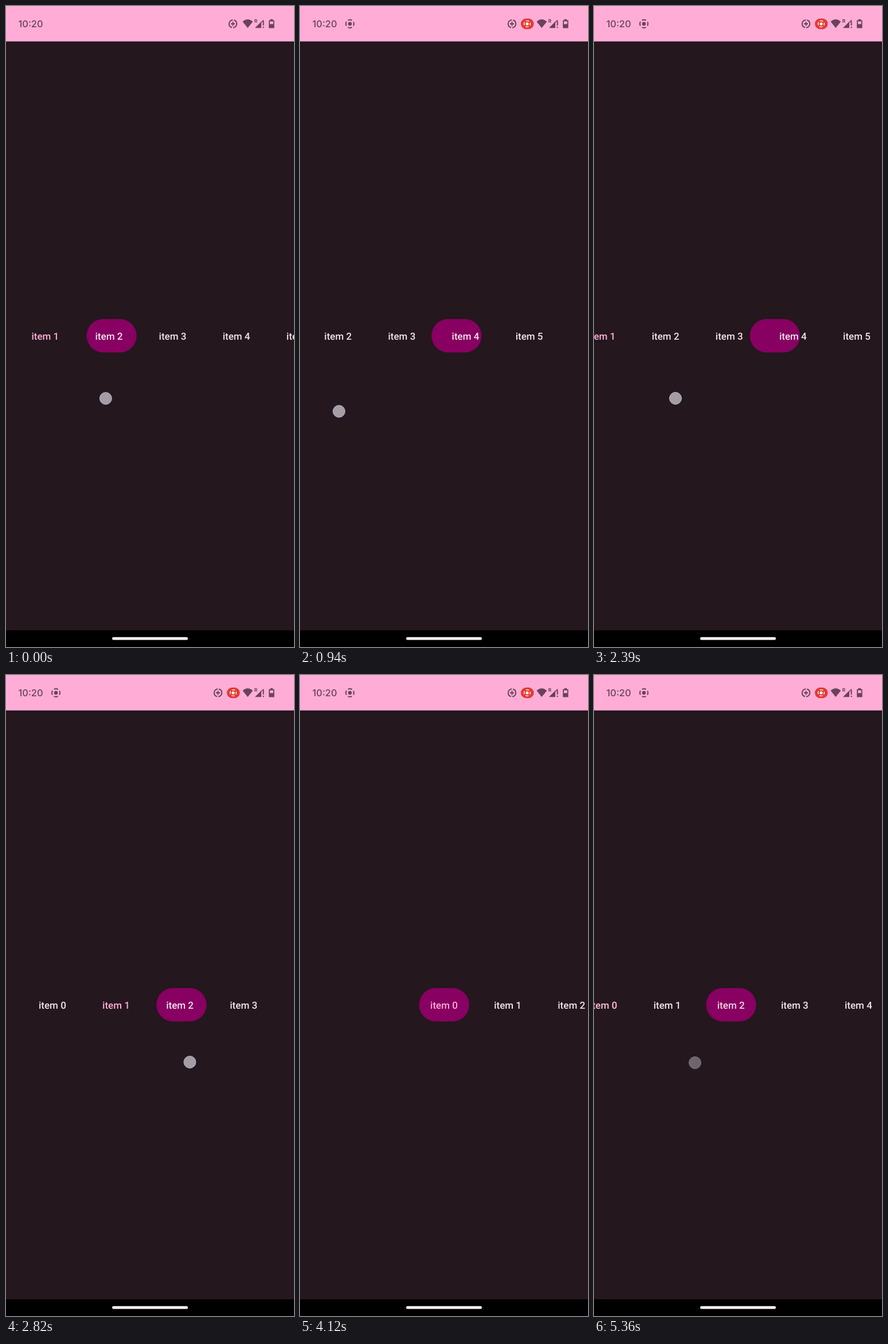
Animation of 502 by 1116 pixels, one loop 5390 ms. Source, as an HTML page:

```html
<!DOCTYPE html>
<html lang="en">
<head>
<meta charset="utf-8">
<title>Item picker</title>
<style>
  html, body { margin: 0; width: 100%; height: 100%; overflow: hidden; background: #24171d; }
  svg { display: block; width: 502px; height: 1116px; text-rendering: geometricPrecision; }
  .label { font: 500 17px Roboto, sans-serif; text-anchor: middle; }
  .clock { font: 500 16.4px Inter, sans-serif; }
  .roam { font: 700 8.5px Roboto, sans-serif; }
  .ink { fill: #6a4259; }
  .line { fill: none; stroke: #6a4259; stroke-width: 2; }
</style>
</head>
<body>
<svg viewBox="0 0 502 1116">
  <rect width="502" height="1116" fill="#24171d"/>

  <g id="row">
    <rect id="pill" x="-43.4" y="545" width="87.3" height="58.3" rx="29.1" fill="#880062"/>
  </g>
  <circle id="touch" r="10.5" fill="#a69da1" stroke="#a8b8e8"/>

  <rect width="502" height="61.7" fill="#ffadd7"/>
  <text class="clock ink" x="21.5" y="37">10:20</text>
  <g id="cast" transform="translate(87 31)">
    <circle class="line" r="7" stroke-dasharray="7.4 3.6" stroke-dashoffset="3.7"/>
    <circle class="ink" r="3.2"/>
  </g>
  <g id="saver">
    <circle class="line" r="6.7" stroke-dasharray="19 2 19.1 2" stroke-dashoffset="9"/>
    <path class="line" d="M-3.5 0h7M0-3.5v7"/>
  </g>
  <g id="chip" transform="translate(396 31)">
    <rect x="-11" y="-9.3" width="22.5" height="18.6" rx="9.3" fill="#e23a32"/>
    <circle r="5.4" fill="none" stroke="#fff" stroke-width="1.4" stroke-dasharray="5.8 2.68" stroke-dashoffset="2.9"/>
    <circle r="2.6" fill="#fff"/>
  </g>
  <path class="ink" d="M412.5 27.3Q421.3 19 430.2 27.3L421.3 38.2Z"/>
  <text class="roam ink" x="432.7" y="29.2">R</text>
  <path class="ink" d="M434 38.3L445 27.3V38.3Z"/>
  <path class="line" d="M436 37.5L449 24.5" style="stroke-width:1.2"/>
  <path class="line" d="M448.6 26v8M448.6 36v2.3"/>
  <path class="ink" d="M460.7 23h4.4v1.7h2.5V38.4h-9.4V24.7h2.5Z"/>
  <rect x="460" y="26.7" width="5.8" height="4.8" fill="#ffadd7"/>

  <rect y="1087" width="502" height="29" fill="#000"/>
  <rect x="185" y="1098.7" width="132" height="5" rx="2.5" fill="#f4eff0"/>
</svg>
<script>
const LOOP = 5390, PITCH = 111.1, MIDDLE = 251, TWEEN = 300;
const FRAME = 16;        // the pill reacts one display frame late
const LEAD = 35;         // the row trails the finger by this much
const SECOND = 4440;     // the finger comes down again
const PLAIN = [243, 228, 233], CHOSEN = [255, 173, 215];

const $ = id => document.getElementById(id);
const ramp = (t, start, length) => Math.min(1, Math.max(0, (t - start) / length));
const settle = (t, start, tau) => 1 - Math.exp(-Math.max(0, t - start) / tau);

// cubic-bezier(.4, 0, .2, 1)
function ease(x) {
  let lo = 0, hi = 1;
  for (let i = 0; i < 20; i++) {
    const s = (lo + hi) / 2, r = 1 - s;
    if (1.2 * s * r * r + .6 * s * s * r + s ** 3 < x) lo = s; else hi = s;
  }
  return lo * lo * (3 - 2 * lo);
}
const glide = (t, start, length) => ease(ramp(t, start, length));

// Steady speed with short soft ends
function cruise(x, soft = .082) {
  if (x > .5) return 1 - cruise(1 - x, soft);
  return (x < soft ? x * x / (2 * soft) : x - soft / 2) / (1 - soft);
}

// Centre of the first item: slow to a stop, drag left, drag right to item 0, swipe to item 2
const scroll = t => -90.5 + 48 * Math.exp(-t / 180)
  - 68 * glide(t, 480, 600)
  + 409.5 * cruise(ramp(t, 2200, 1075))
  - 234.5 * glide(t, 4470, 780);

const touchX = t => scroll(t + LEAD) + (t < SECOND ? 225 : 159.5);
const touchY = t => t < SECOND
  ? 683 + 22.8 * settle(t, 0, 180) - 32.5 * settle(t, 2200, 158)
  : 645 + 30 * glide(t, 4800, 400);

// The pill hops whenever another item comes nearest to the middle
const nearest = t => Math.round((MIDDLE - scroll(t)) / PITCH);
const first = nearest(-100), hops = [];
for (let t = -99; t < LOOP; t++) {
  const step = nearest(t) - nearest(t - 1);
  if (step) hops.push({ start: t + FRAME, step });
}
const pillAt = t => hops.reduce((at, hop) => at + hop.step * glide(t, hop.start, TWEEN), first);

const row = $("row"), pill = $("pill"), touch = $("touch");
const labels = Array.from({ length: 6 }, (_, i) => {
  const label = document.createElementNS("http://www.w3.org/2000/svg", "text");
  label.setAttribute("class", "label");
  label.setAttribute("x", i * PITCH);
  label.setAttribute("y", 580.7);
  label.textContent = "item " + i;
  return row.appendChild(label);
});

const place = (el, x, y) => el.setAttribute("transform", `translate(${x.toFixed(2)} ${y.toFixed(2)})`);
const blend = k => `rgb(${PLAIN.map((v, i) => Math.round(v + (CHOSEN[i] - v) * k))})`;

function draw(t) {
  place(row, scroll(t), 0);
  place(pill, pillAt(t) * PITCH, 0);

  // The choice moves when the finger lifts: 1, then 0, then 2
  const toZero = glide(t, 3190, TWEEN), toTwo = glide(t, 5280, TWEEN);
  const tint = [toZero - toTwo, 1 - toZero, toTwo];
  labels.forEach((label, i) => label.setAttribute("fill", blend(tint[i] || 0)));

  place(touch, touchX(t), touchY(t));
  touch.setAttribute("opacity", t < SECOND ? 1 - ramp(t, 3160, 90) : ramp(t, SECOND, 30) - ramp(t, 5325, 85));

  const live = glide(t, 120, 250);
  $("cast").setAttribute("opacity", live);
  $("chip").setAttribute("opacity", live);
  place($("saver"), 395.5 - 26 * live, 31);
}

const start = performance.now();
function tick() {
  draw((performance.now() - start) % LOOP);
  requestAnimationFrame(tick);
}
tick();
</script>
</body>
</html>
```
